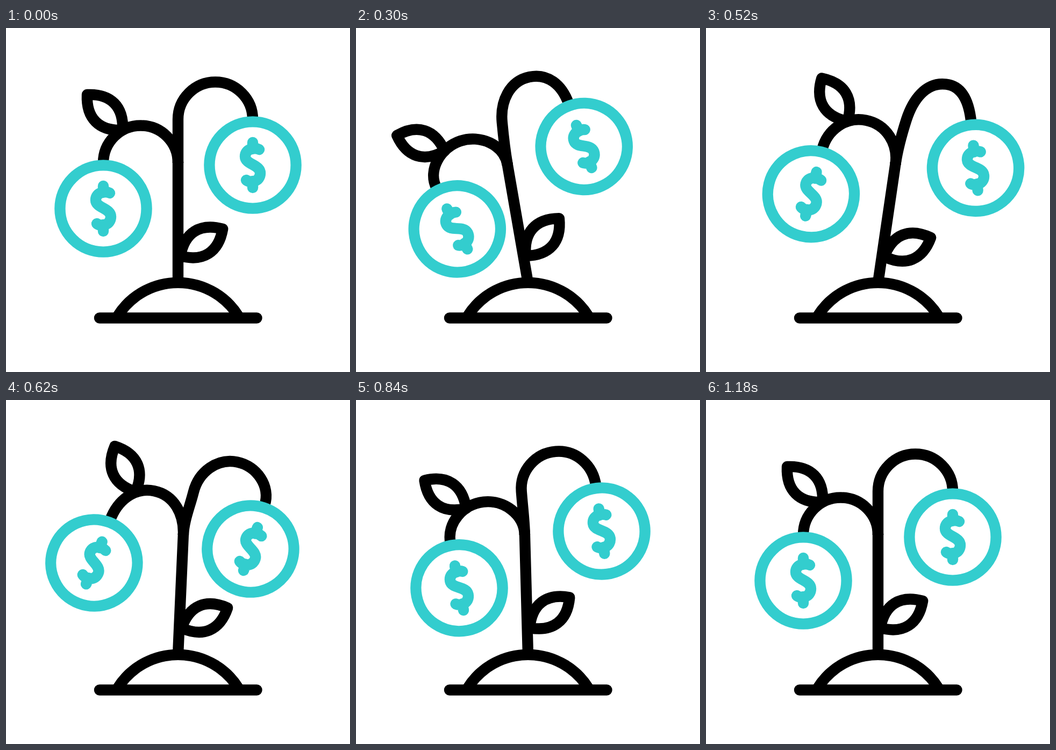
Recreate the animation shown at these times as an HTML page. Size 640 by 640 pixels, loop 2.4 s.

```html
<!DOCTYPE html>
<html lang="en">
<head>
<meta charset="utf-8">
<title>Money plant</title>
<style>
  html, body { margin: 0; width: 100%; height: 100%; overflow: hidden; background: #fff; }
  svg { display: block; width: 100%; height: 100%; }
  path, circle { fill: none; stroke: #000; stroke-width: 20.4; stroke-linejoin: round; }
  .coin * { stroke: #33cdce; stroke-linecap: round; }
</style>
</head>
<body>
<svg viewBox="0 0 640 640">
  <defs>
    <g id="coin" class="coin">
      <circle r="80.6"/>
      <path d="M0-42V-30M0 42V30M12-29C4-33-14-31-14-16C-14-1 14-1 14 15C14 31-4 34-12 28"/>
    </g>
    <path id="leaf" d="M0 0C2-44-22-68-66-66C-68-22-44 2 0 0Z"/>
  </defs>
  <path id="stem"/>
  <path id="leftArch"/>
  <path id="rightArch"/>
  <use id="leftLeaf" href="#leaf"/>
  <use id="rightLeaf" href="#leaf"/>
  <use id="leftCoin" href="#coin"/>
  <use id="rightCoin" href="#coin"/>
  <path d="M207 537A132.7 132.7 0 0 1 433 537"/>
  <path d="M174 539.5H466.5" stroke-linecap="round"/>
</svg>
<script>
const LOOP = 2400, STEP = 20, ROOT = [320, 474];
const el = id => document.getElementById(id);

// Keys are [time, value], joined by eased segments.
const STEM = [[25, 0], [265, -11.1], [495, 8.7], [750, -4], [940, 1.3], [1180, 0]];
const LEFT = [[75, 0], [360, -9.6], [620, 9], [860, -5], [1040, 2], [1180, 0]];
const RIGHT = [[160, 0], [460, -11], [690, 13], [885, -5.3], [1060, 2], [1180, 0]];
const SQUEEZE = [[180, 0], [440, 1.03], [690, 0]];

function at(keys, t) {
  if (t <= keys[0][0]) return keys[0][1];
  for (let i = 1; i < keys.length; i++) {
    const [t0, a] = keys[i - 1], [t1, b] = keys[i];
    if (t < t1) {
      const u = (t - t0) / (t1 - t0);
      return a + (b - a) * u * u * (3 - 2 * u);
    }
  }
  return keys[keys.length - 1][1];
}

// Point at offset (x, y) from p, turned by deg.
function off(p, x, y, deg) {
  const a = deg * Math.PI / 180, c = Math.cos(a), s = Math.sin(a);
  return [p[0] + x * c - y * s, p[1] + x * s + y * c];
}

const curve = (start, ...pts) => `M${start}C${pts.join(' ')}`;
const place = (id, p, deg) =>
  el(id).setAttribute('transform', `translate(${p}) rotate(${deg})`);
const shape = (id, d) => el(id).setAttribute('d', d);

function draw(t) {
  const s = at(STEM, t), l = at(LEFT, t), r = at(RIGHT, t), k = at(SQUEEZE, t);
  const joint = off(ROOT, 0, -223, s);
  shape('stem', `M${ROOT}L${joint}L${off(joint, 0, -2, s)}`);

  // Left branch, its leaf and coin
  const lb = s + l, lc = s + 2 * l;
  const lTop = off(joint, -69.5, -69.5, lb), lEnd = off(joint, -139, 0, lb);
  shape('leftArch', curve(joint,
    off(joint, 0, -38.4, s), off(lTop, 38.4, 0, lb), lTop,
    off(lTop, -38.4, 0, lb), off(lEnd, 0, -38.4, lc), lEnd));
  place('leftLeaf', off(joint, -103, -61, lb), lc);
  place('leftCoin', off(lEnd, 0, 85, lc), lc);

  // Right branch and coin
  const rb = s + r, rc = s + 2 * r, bend = rb + 21 * k, tilt = rb + 7 * k;
  const knee = off(off(joint, 0, -81, rb), 23.5 * k, -2 * k, 0);
  const rTop = off(off(joint, 69.5, -150.5, rb), 27 * k, 0, 0);
  const rEnd = off(joint, 139, -81, rb);
  shape('rightArch', curve(joint,
    off(joint, 0, -27, s), off(knee, 0, 30, bend), knee,
    off(knee, 0, -38.4, bend), off(rTop, -38.4, 0, tilt), rTop,
    off(rTop, 38.4 - 10 * k, 0, tilt), off(rEnd, 0, -38.4, rc), rEnd));
  place('rightCoin', off(rEnd, 0, 85, rc), rc);

  place('rightLeaf', off(ROOT, 4.5, -50, s), 102.5 + s + 0.7 * l);
}

function frame() {
  const t = performance.now() % LOOP;
  draw(Math.floor(t / STEP) * STEP);
  requestAnimationFrame(frame);
}
frame();
</script>
</body>
</html>
```
